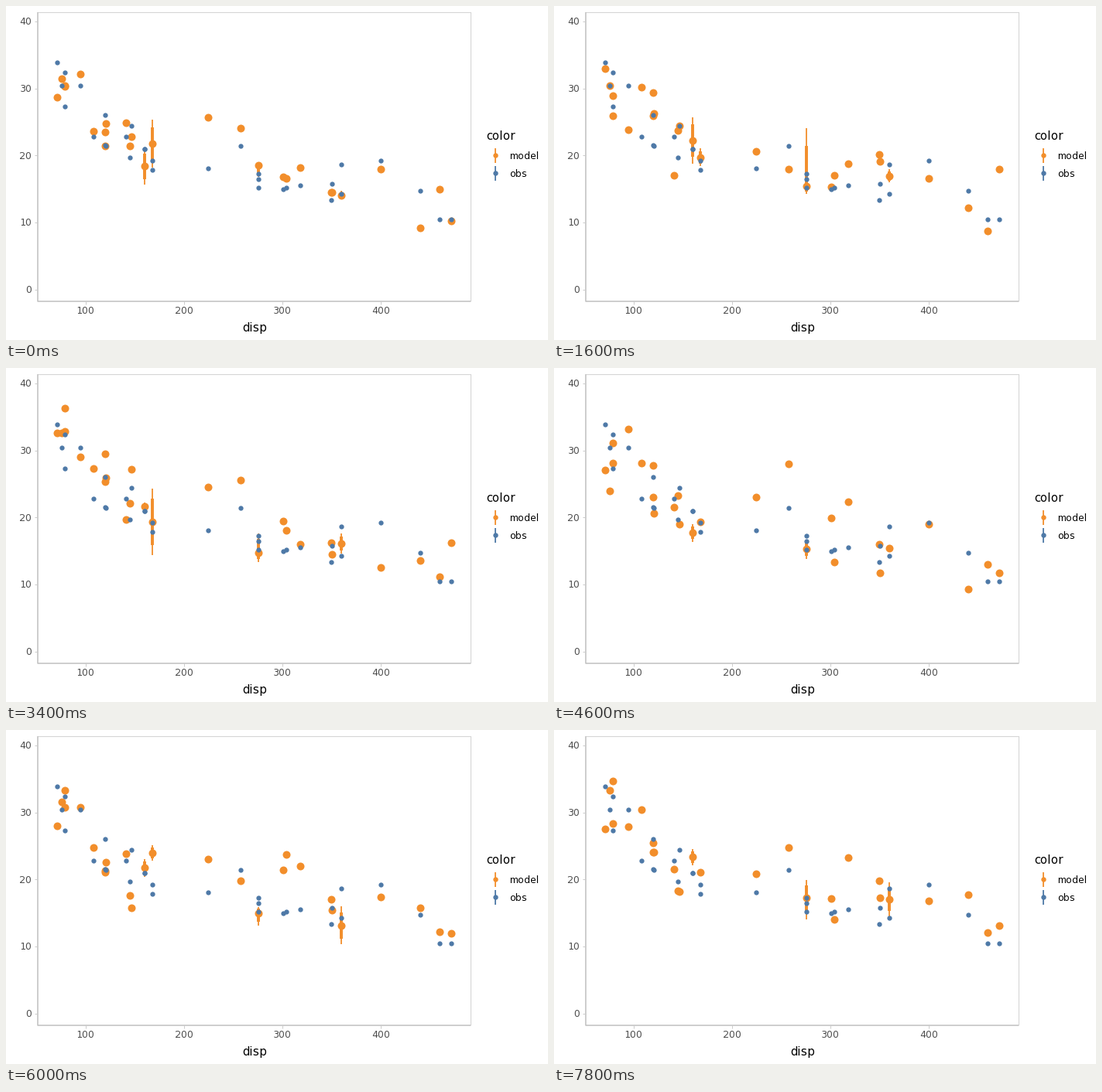
These frames come from a looping animation (700 px wide and 432 px high, 8000 ms). A matplotlib script:

```python
import numpy as np
import matplotlib.pyplot as plt
from matplotlib.animation import FuncAnimation

# Whole-pixel glyph spacing
plt.rcParams["text.hinting"] = "force_autohint"
plt.rcParams["text.hinting_factor"] = 1

W, H, DPI = 700, 432, 100
FRAMES, STEP = 40, 200
ORANGE, BLUE = "#F28E2B", "#4E79A7"
PX = 72 / DPI  # points per pixel

# Observed cars of mtcars: displacement and miles per gallon
disp = np.array([
    71.1, 75.7, 78.7, 79, 95.1, 108, 120.1, 120.3, 121, 140.8, 145, 146.7,
    160, 160, 167.6, 167.6, 225, 258, 275.8, 275.8, 275.8, 301, 304, 318,
    350, 351, 360, 360, 400, 440, 460, 472])
mpg = np.array([
    33.9, 30.4, 32.4, 27.3, 30.4, 22.8, 21.5, 26, 21.4, 22.8, 19.7, 24.4,
    21, 21, 19.2, 17.8, 18.1, 21.4, 16.4, 17.3, 15.2, 15, 15.2, 15.5,
    13.3, 15.8, 18.7, 14.3, 19.2, 14.7, 10.4, 10.4])

# Every step shows a fresh predictive draw: fitted mean plus normal noise
mean = np.interp(disp, [71, 108, 145, 168, 225, 258, 276, 318, 360, 400, 472],
                 [28.7, 27, 21.5, 20.5, 23.2, 21.4, 16.8, 18.5, 15.5, 15.8, 12])
rng = np.random.default_rng(12)
draws = np.clip(rng.normal(mean, 2.8, (FRAMES, disp.size)), 3.6, 38.5)

groups = [(d, disp == d) for d in np.unique(disp)]


def sx(d):
    return 102.7 + 1.27 * (np.asarray(d) - 100)


def sy(v):
    return 366.5 - 8.66 * np.asarray(v)


fig = plt.figure(figsize=(W / DPI, H / DPI), dpi=DPI, facecolor="white")
ax = fig.add_axes([0, 0, 1, 1])
ax.set(xlim=(0, W), ylim=(H, 0))
ax.axis("off")


def line(xs, ys, color, width):
    ax.plot(xs, ys, color=color, lw=width * PX, solid_capstyle="butt")


def label(x, y, text, size, color="black", ha="left"):
    ax.text(x, y, text, fontsize=size * PX, color=color, ha=ha,
            va="baseline", family="DejaVu Sans")


def dots(x, y, size, color, z):
    return ax.scatter(x, y, s=(size * PX) ** 2, color=color, lw=0, zorder=z)


# Panel, axes and legend
L, R, T, B = 41, 600, 8.2, 381.5
line([L, R, R], [T, T, B], "#D6D6D6", 1.1)
line([L, L, R], [T, B, B], "#BEBEBE", 1.5)
for d in (100, 200, 300, 400):
    line([sx(d)] * 2, [B, B + 4], "#CCCCCC", 1)
    label(sx(d), 397.5, str(d), 12, "#4D4D4D", "center")
for v in (0, 10, 20, 30, 40):
    line([L - 4, L], [sy(v)] * 2, "#CCCCCC", 1)
    label(33.5, sy(v) + 4.3, str(v), 12, "#4D4D4D", "right")
label(321, 421, "disp", 14.67, ha="center")
label(620.5, 173, "color", 14.67)
for y, name, color in ((193.4, "model", ORANGE), (216.4, "obs", BLUE)):
    line([632.1] * 2, [y - 9.3, y + 9.3], color, 1.8)
    dots([632.1], [y], 6.4, color, 3)
    label(650.5, y + 4.2, name, 11.73)

thin = ax.vlines([], [], [], color=ORANGE, lw=1.8 * PX, zorder=3)
thick = ax.vlines([], [], [], color=ORANGE, lw=3.9 * PX, zorder=4)
model = dots([], [], 10, ORANGE, 5)
dots(sx(disp), sy(mpg), 6.3, BLUE, 6)


def update(i):
    """Show the median, 66% and 95% interval of the draws at each disp."""
    points, wide, narrow = [], [], []
    for d, rows in groups:
        x = sx(d)
        q = sy(np.quantile(draws[i, rows], [.025, .17, .5, .83, .975]))
        points.append((x, q[2]))
        if rows.sum() > 1:
            wide.append([(x, q[0]), (x, q[4])])
            narrow.append([(x, q[1]), (x, q[3])])
    model.set_offsets(points)
    thin.set_segments(wide)
    thick.set_segments(narrow)
    return thin, thick, model


anim = FuncAnimation(fig, update, frames=FRAMES, interval=STEP,
                     init_func=lambda: update(0), repeat=True, repeat_delay=0)
plt.show()
```
